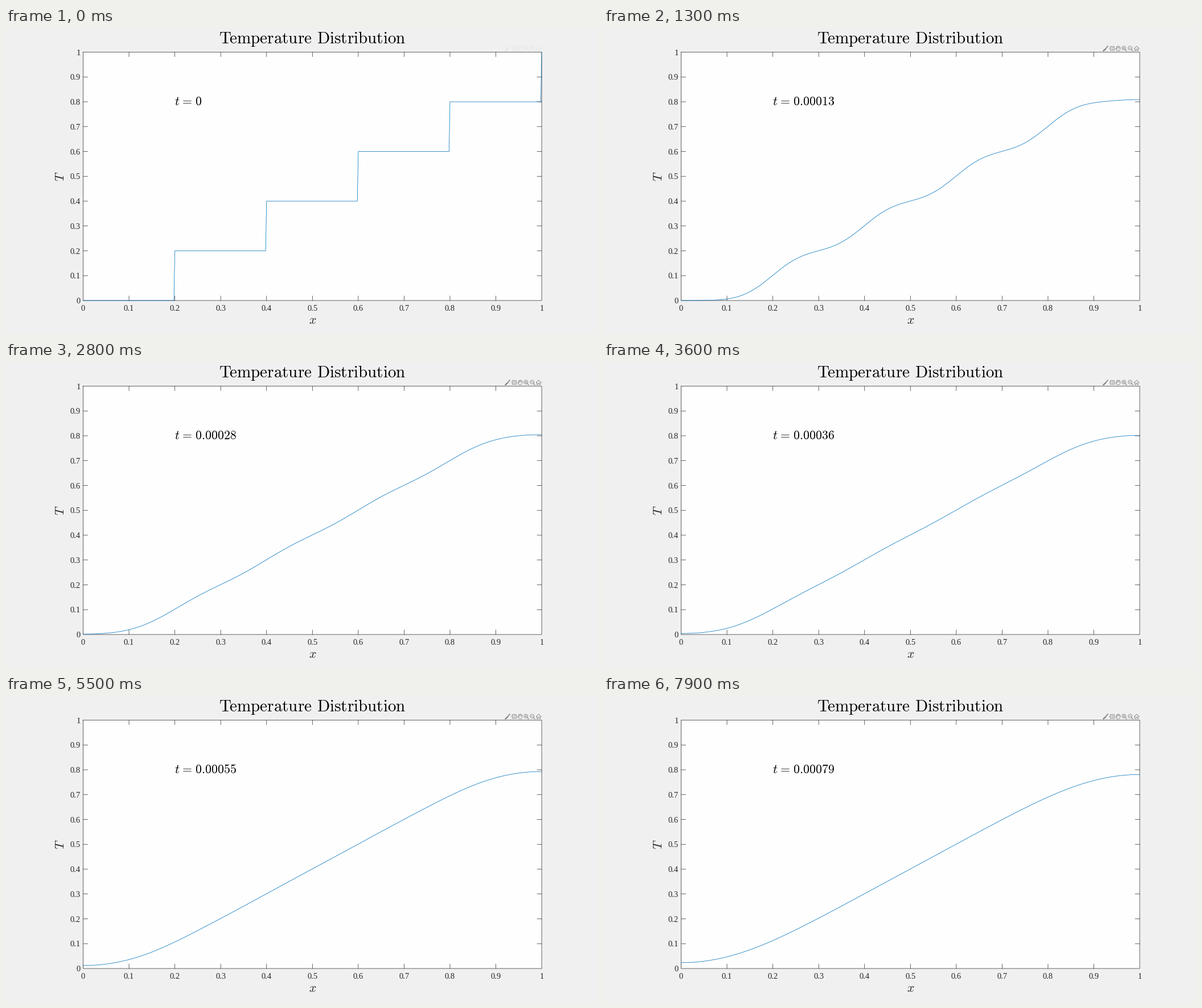
A matplotlib script for the animation above (8 s loop, 1040 px wide and 539 px high).

```python
import math

import matplotlib.pyplot as plt
import numpy as np
from matplotlib.animation import FuncAnimation
from matplotlib.patches import Circle, Polygon, Rectangle

W, H, DPI = 1040, 539, 100
FRAMES, INTERVAL = 80, 100
PT = 72 / DPI                      # points per pixel
LEFT, RIGHT, TOP, BOTTOM = 135.5, 941.1, 42.5, 480
DIFFUSIVITY, DT, DX = 10, 1e-5, 0.002
END_HEAT = 0.2 * 1.5 * DX          # heat held by the hot right end
INK, BLUE, TOOL = "#262626", "#0072BD", "#808080"

plt.rcParams["mathtext.fontset"] = "cm"
plt.rcParams["font.family"] = "Liberation Serif"

fig = plt.figure(figsize=(W / DPI, H / DPI), dpi=DPI, facecolor="#f0f0f0")
ax = fig.add_axes([0, 0, 1, 1])
ax.set_xlim(0, W)
ax.set_ylim(H, 0)
ax.axis("off")

erfc = np.vectorize(math.erfc)
grid = np.linspace(0, 1, round(1 / DX) + 1)


def px(x):
    return LEFT + (RIGHT - LEFT) * x


def py(y):
    return BOTTOM - (BOTTOM - TOP) * y


def line(xs, ys, color=INK, width=0.7, **kw):
    return ax.plot(xs, ys, color=color, lw=width * PT, snap=False, **kw)[0]


def label(x, y, text, size, color="black", **kw):
    return ax.text(x, y, text, fontsize=size * PT, color=color,
                   va="baseline", **kw)


def temperature(t):
    """Insulated rod that starts as a staircase."""
    if t == 0:
        return np.floor(5 * grid + 1e-9) / 5
    spread = 2 * math.sqrt(DIFFUSIVITY * t)
    temp = np.zeros_like(grid)
    for k in range(1, 5):
        a = 0.2 * k - DX / 2
        temp += 0.1 * (erfc((a - grid) / spread) + erfc((a + grid) / spread)
                       - erfc((2 - a - grid) / spread))
    peak = 2 * END_HEAT / (math.sqrt(math.pi) * spread)
    return temp + peak * np.exp(-((1 - grid) / spread) ** 2)


def time_text(i):
    value = f"{i * DT:.4g}"
    value = value.replace("e-", r"e\hspace{0.053}-\hspace{0.053}")
    return rf"$t\hspace{{0.116}}=\hspace{{0.116}}{value}$"


def draw_axes():
    ax.add_patch(Rectangle((LEFT, TOP), RIGHT - LEFT, BOTTOM - TOP,
                           fc="#fefefe", ec="none"))
    for k in range(11):
        x, y, name = px(k / 10), py(k / 10), f"{k / 10:g}"
        if 0 < k < 10:
            for edge, step in ((BOTTOM, -8), (TOP, 8)):
                line([x, x], [edge, edge + step])
            for edge, step in ((LEFT, 8), (RIGHT, -8)):
                line([edge, edge + step], [y, y])
        label(x, 498, name, 14.5, INK, ha="center")
        label(131, y + 5.2, name, 14.5, INK, ha="right")
    line([LEFT, RIGHT, RIGHT, LEFT, LEFT], [TOP, TOP, BOTTOM, BOTTOM, TOP])
    label(538.5, 27, r"$\mathrm{T}\hspace{-0.095}\mathrm{emperature}"
          r"\hspace{0.38}\mathrm{Distribution}$", 29.1, ha="center")
    label(538.5, 521, "$x$", 21.8, INK, ha="center")
    label(102.5, 261, "$T$", 21.8, INK, ha="center", rotation=90,
          rotation_mode="anchor")


def draw_toolbar():
    parts = []

    def stroke(xs, ys, width=0.8):
        parts.append(line(xs, ys, TOOL, width))

    def shape(patch):
        patch.set(fc="none", ec=TOOL, lw=0.8 * PT, snap=False)
        parts.append(ax.add_patch(patch))

    stroke([885, 880.5], [32, 37.5], 1.6)          # brush
    stroke([880.5, 877.5], [37.5, 40], 2.2)
    shape(Rectangle((889.5, 32.5), 7, 7))          # data tip
    for y in (34.7, 37.3):
        stroke([891.3, 895], [y, y])
    stroke([888, 889.5], [36, 36])
    shape(Polygon([(901, 40), (898.6, 36.4), (899.6, 35.6), (901, 37),
                   (900.6, 33), (902, 32.6), (903, 31.8), (904.4, 32.4),
                   (906, 33.2), (907, 35), (906.6, 38), (905.4, 40)]))
    for x in (902, 903.6, 905.2):                  # fingers
        stroke([x, x], [32.8, 35.6], 0.6)
    for x in (913.2, 924.2):                       # zoom in and out
        shape(Circle((x, 35.4), 3.4))
        stroke([x + 2.4, x + 5], [37.8, 40.4], 1.1)
        stroke([x - 1.8, x + 1.8], [35.4, 35.4])
    stroke([913.2, 913.2], [33.6, 37.2])
    stroke([931.2, 935.7, 940.2], [36.4, 32, 36.4])  # home
    stroke([932.6, 932.6, 934.6, 934.6, 936.8, 936.8, 938.8, 938.8],
           [35.6, 40, 40, 37.2, 37.2, 40, 40, 35.6])
    return parts


draw_axes()
tools = draw_toolbar()
curve = line([], [], BLUE, 0.75, zorder=3)
clock = label(295.8, 136, "", 21.8, ha="left")


def update(i):
    # the solver runs one step ahead of the clock once it has started
    steps = i + 1 if i else 0
    curve.set_data(px(grid), py(temperature(steps * DT)))
    clock.set_text(time_text(i))
    for part in tools:
        part.set_alpha(min(1, 0.08 + 0.5 * i))
    return [curve, clock, *tools]


anim = FuncAnimation(fig, update, frames=FRAMES, interval=INTERVAL,
                     init_func=lambda: update(0), repeat=True, repeat_delay=0)
plt.show()
```
